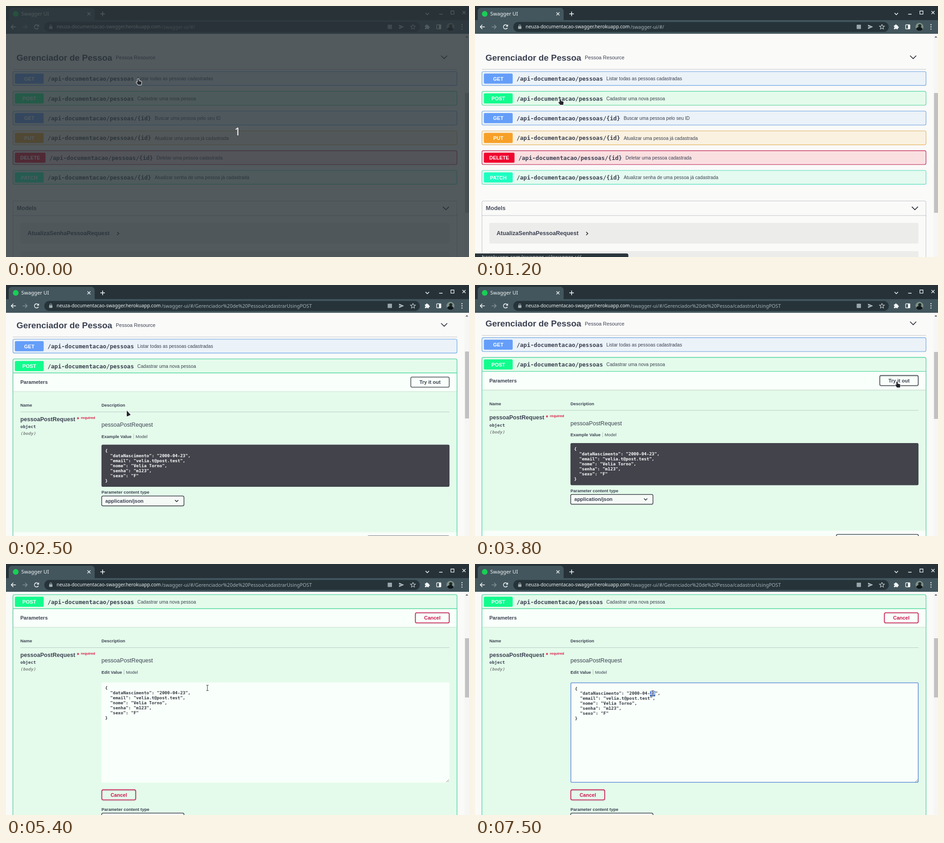
These frames come from a looping animation (1016x551 px, 8 s). An HTML page with a canvas:

```html
<!DOCTYPE html>
<html lang="pt">
<head>
<meta charset="utf-8">
<title>Swagger UI</title>
<style>
html, body { margin: 0; width: 100%; height: 100%; overflow: hidden; background: #fafaf9; }
canvas { display: block; width: 1016px; height: 551px; }
</style>
</head>
<body>
<canvas id="stage" width="1016" height="551"></canvas>
<script>
const ctx = document.getElementById('stage').getContext('2d');
const W = 1016, H = 551, LOOP = 8000;
const SANS = '"Liberation Sans", Arial, sans-serif';
const MONO = '"DejaVu Sans Mono", monospace';
const UI = '"Noto Sans", "Open Sans", sans-serif';
const INK = '#3b4151', RULE = 'rgba(59,65,81,.3)', RED = '#d01550', GREEN = '#4fd8a0';
const TITLE = 18.9, BIG = 12.6, MID = 11.02, DESC = 10.24, SMALL = 9.45, TINY = 7.87;

const ROWS = [
  ['GET', '', 'Listar todas as pessoas cadastradas', '#649ef9', '#6ba5ea', '#ebf2f8'],
  ['POST', '', 'Cadastrar uma nova pessoa', '#12fc8e', GREEN, '#e4fbeb'],
  ['GET', '/{id}', 'Buscar uma pessoa pelo seu ID', '#649ef9', '#6ba5ea', '#ebf2f8'],
  ['PUT', '/{id}', 'Atualizar uma pessoa já cadastrada', '#f7a028', '#e9b860', '#faf1e1'],
  ['DELETE', '/{id}', 'Deletar uma pessoa cadastrada', '#f0052f', '#c01c4f', '#fadfe1'],
  ['PATCH', '/{id}', 'Atualizar senha de uma pessoa já cadastrada', '#1cffc0', '#4fe3c0', '#e5faf0']
];
const BODY = [
  '{',
  '  "dataNascimento": "2000-04-23",',
  '  "email": "velia.t@post.test",',
  '  "nome": "Velia Torno",',
  '  "senha": "m123",',
  '  "sexo": "F"',
  '}'
];

// Keys are [time, value...]
const SCROLL = [[2300, 0], [2500, 25], [2800, 25], [3000, 28.4], [4600, 28.4],
  [4700, 38.8], [4800, 74], [4900, 74], [5200, 120]];
const POINTER = [[0, 290, 160], [900, 187, 204], [1600, 187, 204], [1900, 265, 275.5],
  [2700, 265, 275.5], [3400, 927, 213], [3700, 927, 213], [3800, 926, 212], [4000, 926, 212],
  [4700, 629.5, 291.5], [4800, 600, 287], [4900, 600, 287], [5200, 458, 273], [5300, 458, 273],
  [5400, 442, 272], [5600, 392, 279], [5700, 392, 279], [6000, 388, 283], [6100, 388, 283],
  [6400, 391, 284], [6600, 391, 284], [6800, 390, 284]];
const DIM = [[0, .8], [300, 0]];

function track(keys, t) {
  if (t <= keys[0][0]) return keys[0].slice(1);
  for (let i = 1; i < keys.length; i++) {
    const a = keys[i - 1], b = keys[i];
    if (t <= b[0]) {
      const k = (t - a[0]) / (b[0] - a[0]);
      return a.slice(1).map((v, j) => v + (b[j + 1] - v) * k);
    }
  }
  return keys[keys.length - 1].slice(1);
}

function text(str, x, mid, size, color = INK, style = '', family = SANS, align = 'left') {
  ctx.font = `${style} ${size}px ${family}`;
  ctx.fillStyle = color;
  ctx.textAlign = align;
  ctx.fillText(str, x, mid + size * .36);
  return ctx.measureText(str).width;
}
const bold = (str, x, mid, size, color) => text(str, x, mid, size, color, 'bold');

function fill(x, y, w, h, color, r = 0) {
  ctx.fillStyle = color;
  ctx.beginPath();
  ctx.roundRect(x, y, w, h, r);
  ctx.fill();
}

function frame(x, y, w, h, color, lw = 1, r = 3) {
  ctx.strokeStyle = color;
  ctx.lineWidth = lw;
  ctx.beginPath();
  ctx.roundRect(x, y, w, h, r);
  ctx.stroke();
}

function line(points, color, lw = 1) {
  ctx.strokeStyle = color;
  ctx.lineWidth = lw;
  ctx.beginPath();
  points.forEach(([x, y]) => ctx.lineTo(x, y));
  ctx.stroke();
}

function shape(points, color) {
  ctx.fillStyle = color;
  ctx.beginPath();
  points.forEach(([x, y]) => ctx.lineTo(x, y));
  ctx.closePath();
  ctx.fill();
}

function dot(x, y, r, color) {
  ctx.fillStyle = color;
  ctx.beginPath();
  ctx.arc(x, y, r, 0, 7);
  ctx.fill();
}

function shadow(color, blur, dy = 0) {
  ctx.shadowColor = color;
  ctx.shadowBlur = blur;
  ctx.shadowOffsetY = dy;
}
const flat = () => shadow('transparent', 0);

const chevron = (x, y, r, lw = 1.6, color = '#22262e') =>
  line([[x - r, y - r / 2], [x, y + r / 2], [x + r, y - r / 2]], color, lw);

function button(label, x, y, w, color) {
  shadow('rgba(0,0,0,.2)', 2, 1);
  frame(x, y, w, 22.2, color, 1.6);
  flat();
  text(label, x + w / 2, y + 11.2, MID, color === RED ? RED : INK, 'bold', SANS, 'center');
}

function select(y) {
  text('Parameter content type', 209.5, y - 8.5, SMALL, INK, 'bold');
  shadow('rgba(0,0,0,.25)', 2, 1);
  fill(210, y, 180.5, 21.5, '#f6faf7', 3);
  flat();
  frame(210, y, 180.5, 21.5, '#41444e', 1.5);
  bold('application/json', 218, y + 10.5, MID);
  chevron(374.5, y + 10.7, 3.6, 1.5);
}

function row(i, y, open) {
  const [method, tail, note, badge, edge, bg] = ROWS[i];
  const height = open ? 900 : 30.4;
  shadow('rgba(0,0,0,.22)', 2);
  fill(15.3, y, 974.3, height, bg, 3);
  flat();
  frame(15.3, y, 974.3, height, edge, open ? 1.3 : 1.1);
  const w = method === 'DELETE' ? 67.2 : 63.2;
  fill(19.5, y + 4.3, w, 22.2, badge, 2.5);
  text(method, 19.5 + w / 2, y + 15.6, MID, '#fff', 'bold', SANS, 'center');
  const x = 27.8 + w + .2;
  const len = text('/api-documentacao/pessoas' + tail, x, y + 15.7, BIG, INK, 'bold', MONO);
  text(note, x + len + 7.5, y + 15.7, DESC);
}

function models() {
  frame(15.3, 428, 974.3, 200, RULE);
  bold('Models', 23.7, 443.7, BIG, '#494e5c');
  line([[15, 460], [990, 460]], RULE);
  chevron(965.3, 444, 6.7);
  fill(31.5, 476, 941.7, 45.5, '#ececeb', 3);
  fill(31.5, 538, 941.7, 45.5, '#ececeb', 3);
  bold('AtualizaSenhaPessoaRequest', 47.2, 498.7, BIG);
  line([[244, 496], [247.6, 499.5], [244, 503]], '#22262e', 1.6);
}

function jsonLines(x, mid, pitch, color) {
  BODY.forEach((s, i) => text(s, x, mid + i * pitch, SMALL, color, 'bold', MONO));
}

function editor(t) {
  const focus = t >= 7000, picked = t >= 7500;
  fill(209.5, 380, 763.7, 220, '#f9fffa', 3);
  if (focus) frame(210.4, 380.8, 762.2, 218.4, '#6090d8', 1.6, 2);
  const x = focus ? 219.2 : 217.4, y = focus ? 393.1 : 391.6, pitch = 10.92;
  jsonLines(x, y, pitch, '#31363f');
  const cell = ctx.measureText('0').width;
  if (picked) {
    const sx = x + 29 * cell;
    fill(sx, 399, cell * 2, 11.6, '#3467cf');
    text('23', sx, y + pitch, SMALL, '#fff', 'bold', MONO);
  } else if (focus) fill(x + 30 * cell, 399, .9, 11, INK);
  line([[966, 599], [972, 593]], '#777', .9);
  line([[969.5, 599], [972, 596.5]], '#777', .9);
  button('Cancel', 210.3, 615.6, 74.3, RED);
  select(666.8);
}

function example() {
  fill(209.5, 375.5, 763.7, 92.5, '#42434b', 3);
  jsonLines(217.4, 388.2, 11.02, '#fff');
  select(488.2);
  fill(16, 567.7, 973, 45, '#f8fefa');
  frame(793, 576, 180, 22, '#41444e', 1.5);
}

function operation(t) {
  const edit = t >= 4000;
  row(1, 187.4, true);
  shadow('rgba(0,0,0,.14)', 2, 1);
  fill(16, 218.5, 973, 39.7, '#f9fffa');
  flat();
  line([[15.5, 218], [989.5, 218]], GREEN, 1.3);
  bold('Parameters', 31.5, 238.3, MID);
  if (edit) button('Cancel', 898.4, 227, 74.2, RED);
  else button('Try it out', 888.3, 227, 84.3, t >= 3400 ? '#4a4d58' : '#5f636c');

  bold('Name', 31.5, 288.7, SMALL);
  bold('Description', 209.5, 288.7, SMALL);
  line([[31.5, 303.6], [973, 303.6]], 'rgba(59,65,81,.25)');
  bold('pessoaPostRequest', 31.5, 319.3, BIG);
  bold('*', 155.6, 319.3, BIG, '#dd1440');
  bold('required', 164.2, 316, TINY, '#dd1440');
  text('object', 31.5, 335.7, SMALL, INK, 'bold', MONO);
  text('(body)', 32, 350.7, SMALL, '#808582', 'italic bold', MONO);
  text('pessoaPostRequest', 209.5, 331.5, BIG);
  const w = bold(edit ? 'Edit Value' : 'Example Value', 209.5, 357.3, SMALL);
  fill(209.5 + w + 4, 351.5, .9, 11.5, '#a9b8ae');
  text('Model', 209.5 + w + 9, 357.3, SMALL);
  if (edit) editor(t); else example();
}

function page(t) {
  const open = t >= 1300, edit = t >= 4000, [s] = track(SCROLL, t);
  fill(0, 61, W, 490, '#fafaf9');
  ctx.save();
  ctx.beginPath();
  ctx.rect(0, 61, W, 490);
  ctx.clip();
  ctx.save();
  ctx.translate(0, -s);
  const w = bold('Gerenciador de Pessoa', 23, 113, TITLE);
  text('Pessoa Resource', 23 + w + 8, 113.4, MID);
  chevron(961.5, 112.3, 6.7);
  line([[15, 139], [990, 139]], RULE);
  row(0, 144, false);
  if (open) operation(t);
  else {
    for (let i = 1; i < ROWS.length; i++) row(i, 144 + i * 43.4, false);
    models();
  }
  ctx.restore();

  fill(1006, 61, 10, 490, '#f6f6f5');
  shape([[1008.3, 69.3], [1011.3, 66], [1014.3, 69.3]], '#555');
  if (!open) fill(1007.3, 191, 8.7, 263, '#c1c1c1');
  else if (!edit) fill(1007.3, 139 + s * .28, 8.7, 147, '#c1c1c1');
  else fill(1007.3, 132 + s * .259, 8.7, 130, '#c1c1c1');

  if (t >= 300 && t < 2100) {
    fill(0, 543.3, 336.5, 20, '#2a363b', [0, 4, 0, 0]);
    text('herokuapp.com/swagger-ui/swagger-ui/', 15, 550.8, 11.5, '#dfe4e6', '', UI);
  }
  ctx.restore();
}

function star(x, y, r) {
  const pts = [];
  for (let i = 0; i <= 10; i++) {
    const a = i * Math.PI / 5 - Math.PI / 2, q = i % 2 ? r * .45 : r;
    pts.push([x + q * Math.cos(a), y + q * Math.sin(a)]);
  }
  line(pts, '#c5ced1', 1.1);
}

function chrome(t) {
  const light = '#f2f5f6', grey = '#a4b0b4', bar = '#43565d', strip = '#263238';
  fill(0, 0, W, 31, strip);
  fill(0, 31, W, 30, bar);
  fill(6, 4, 188.5, 28, bar, [7, 7, 0, 0]);
  dot(21.3, 17.3, 6.2, '#18cf55');
  text('Swagger UI', 33.5, 17.3, 11.2, light, '', UI);
  const cross = (x, y, r) => {
    line([[x - r, y - r], [x + r, y + r]], light, 1.4);
    line([[x + r, y - r], [x - r, y + r]], light, 1.4);
  };
  cross(182, 17.3, 3.3);
  cross(1005, 14.3, 3.4);
  line([[207, 17.3], [217, 17.3]], light, 1.6);
  line([[212, 12.3], [212, 22.3]], light, 1.6);
  chevron(924.5, 17.3, 3.8, 1.5, light);
  line([[950.5, 18], [958, 18]], light, 1.5);
  frame(976.3, 11, 6.8, 6.8, light, 1.3, 0);

  const arrow = (x, d, c) => {
    line([[x - 5 * d, 45.8], [x + 5 * d, 45.8]], c, 1.6);
    line([[x + .5 * d, 41.2], [x + 5 * d, 45.8], [x + .5 * d, 50.4]], c, 1.6);
  };
  arrow(16.5, -1, light);
  arrow(41.5, 1, '#7f8f95');
  ctx.strokeStyle = light;
  ctx.lineWidth = 1.6;
  ctx.beginPath();
  ctx.arc(67, 45.8, 4.6, .5, 5.5);
  ctx.stroke();
  shape([[72.4, 40.3], [72.4, 45.2], [67.5, 45.2]], light);

  fill(84, 35, 824, 22, '#26343a', 11);
  fill(94.7, 44.6, 7.2, 5.6, grey, 1);
  frame(96.3, 41.3, 4, 5, grey, 1.1, 2);
  text('neuza-documentacao-swagger.herokuapp.com', 111, 45.7, 10.38, '#eef2f3', '', UI);
  const tail = t >= 1300 ? 'Gerenciador%20de%20Pessoa/cadastrarUsingPOST' : '';
  text('/swagger-ui/#/' + tail, 341, 45.7, 10.58, grey, '', UI);
  fill(837.5, 41, 9.5, 9.5, '#98a6ab', 1);
  shape([[862.5, 41], [873.5, 45.7], [862.5, 50.5], [862.5, 46.8], [869, 45.7], [862.5, 44.7]], '#b4bfc3');
  star(893, 46, 5.8);

  fill(919.3, 42.5, 8.6, 8.6, light, 1);
  dot(923.6, 42.2, 1.8, light);
  dot(928.3, 46.8, 1.8, light);
  dot(919.3, 46.8, 1.4, bar);
  dot(923.6, 51.1, 1.4, bar);
  frame(945, 41.3, 9.4, 9, light, 1.4, 1);
  fill(950, 41.3, 4.4, 9, light);
  ctx.save();
  ctx.beginPath();
  ctx.arc(975.3, 45.8, 8.7, 0, 7);
  ctx.clip();
  fill(966, 36, 20, 20, '#7d9187');
  dot(976, 43.5, 3.5, '#20292a');
  dot(975, 54, 8, '#11191b');
  ctx.restore();
  [41, 45.8, 50.6].forEach(y => dot(1000.6, y, 1.2, light));
}

const HAND = [[-1.4, 1], [0, 0], [1.4, 1], [1.6, 4.5], [5.8, 5.4], [7.4, 7], [6.6, 13],
  [0, 13], [-4, 8], [-3.2, 6.6], [-1.4, 7.6]];
const ARROW = [[0, 0], [0, 13], [3.2, 11.9], [8.6, 9.6]];

function pointer(t) {
  const [x, y] = track(POINTER, t);
  ctx.save();
  ctx.translate(x, y);
  if (t >= 5100) {
    const bar = (c, lw) => {
      line([[0, -5.5], [0, 5.5]], c, lw);
      line([[-2.6, -5.8], [2.6, -5.8]], c, lw);
      line([[-2.6, 5.8], [2.6, 5.8]], c, lw);
    };
    bar('rgba(255,255,255,.8)', 2.4);
    bar('#3a3f42', 1.1);
  } else {
    const hand = t < 1700 || (t >= 3400 && t < 4100);
    const pts = hand ? HAND : ARROW;
    line([...pts, pts[0]], '#fff', 1.8);
    shape(pts, '#24282c');
  }
  ctx.restore();
}

function draw(now) {
  const t = Math.floor(now % LOOP / 100) * 100; // ten pictures a second
  ctx.lineJoin = 'miter';
  page(t);
  chrome(t);
  const [dim] = track(DIM, t);
  if (dim > 0) {
    fill(0, 0, W, H, `rgba(40,50,56,${dim})`);
    text('1', 508, 275.6, 24, `rgba(255,255,255,${dim / .8})`, '', UI, 'center');
  }
  pointer(t);
}

const start = performance.now();
function tick() {
  draw(performance.now() - start);
  requestAnimationFrame(tick);
}
tick();
</script>
</body>
</html>
```
